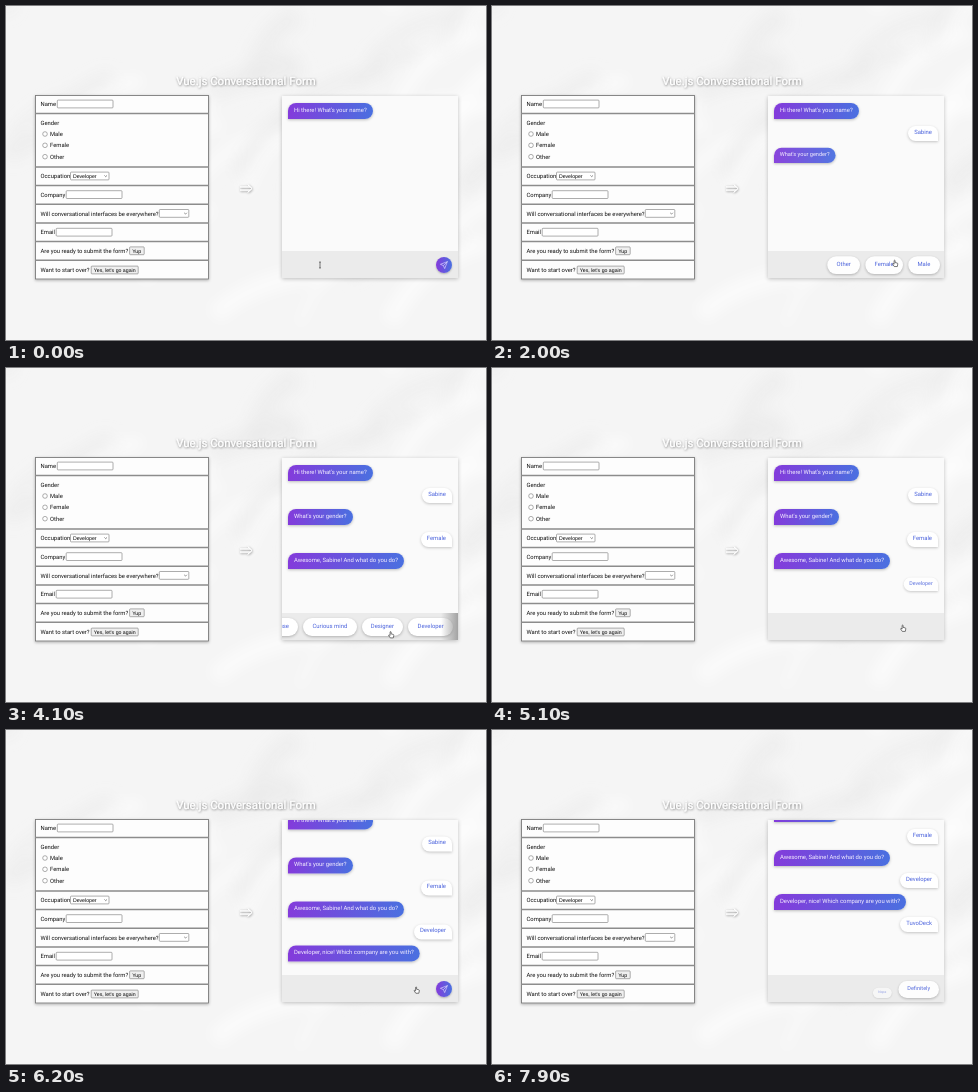
Recreate the animation shown at these times as an HTML page. Size 480 by 334 pixels, loop 8 s.

```html
<!DOCTYPE html>
<html lang="en">
<head>
<meta charset="utf-8">
<title>Conversational Form</title>
<style>
  html, body { margin: 0; width: 100%; height: 100%; overflow: hidden; background: #f5f5f5; }
  body { position: relative; font: 5.9px Roboto, "Open Sans", sans-serif; text-rendering: geometricPrecision; }
  svg { position: absolute; left: 0; top: 0; overflow: visible; }
  .ui { font: 5.2px "Liberation Sans", Arial, sans-serif; }
  .chat { position: absolute; left: 276px; top: 90px; width: 176px; height: 182px;
    background: #fafafa; box-shadow: 0 1px 4px rgba(0,0,0,.24); }
  .log { position: absolute; inset: 0 0 27px; overflow: hidden; }
  .foot { position: absolute; left: 0; right: 0; bottom: 0; height: 27px; background: #ebebeb; overflow: hidden; }
  .msg { position: absolute; padding: 0 6px; white-space: nowrap; }
  .bot { left: 6px; height: 16px; line-height: 16px; color: #f6f0ff; border-radius: 8px 8px 8px 0;
    background: linear-gradient(90deg, #843bdb, #4a70e0); box-shadow: 0 1px 3px rgba(0,0,0,.25); transform-origin: 0 100%; }
  .user { right: 6px; height: 15px; line-height: 15px; color: #4a62dc; border-radius: 8px 8px 0 8px;
    background: #fff; box-shadow: 0 1px 3px rgba(0,0,0,.22); transform-origin: 100% 100%; }
  .opts { position: absolute; right: 5px; top: 5px; display: flex; flex-direction: row-reverse; gap: 5px; }
  .opts div { flex: none; padding: 0 9.3px; height: 18px; line-height: 18px; border-radius: 9px; white-space: nowrap;
    background: #fff; color: #4a62dc; box-shadow: 0 1px 3px rgba(0,0,0,.25); transform-origin: 100% 100%; }
  .fade { position: absolute; right: 0; top: 0; width: 17px; height: 27px;
    background: linear-gradient(90deg, rgba(150,150,150,0), rgba(150,150,150,.85)); }
  .field { position: absolute; left: 6px; top: 8px; height: 12px; line-height: 12px; white-space: pre; color: #111; }
  .caret { position: absolute; left: 100%; top: 0; width: 1px; height: 12px; background: #222; }
  .send { position: absolute; left: 154px; top: 6px; width: 16px; height: 16px; border-radius: 50%;
    background: linear-gradient(90deg, #843bdb, #4a70e0); box-shadow: 0 1px 2px rgba(0,0,0,.25); }
</style>
</head>
<body>
<svg id="page" width="480" height="334" viewBox="0 0 480 334">
  <defs>
    <filter id="soft" x="-20%" y="-20%" width="140%" height="140%"><feGaussianBlur stdDeviation="7"/></filter>
    <filter id="lift" x="-20%" y="-40%" width="140%" height="200%">
      <feDropShadow dx="0.4" dy="0.7" stdDeviation="0.9" flood-color="#000" flood-opacity=".6"/></filter>
    <filter id="card" x="-10%" y="-10%" width="120%" height="120%">
      <feDropShadow dx="0" dy="1" stdDeviation="1.6" flood-color="#000" flood-opacity=".3"/></filter>
  </defs>
  <g id="marble" filter="url(#soft)" fill="none"></g>
  <text x="240" y="79.3" text-anchor="middle" font-size="11.45" fill="#fff" filter="url(#lift)">Vue.js Conversational Form</text>
  <path d="M234 180.9H244.3M234 184.1H244.3M241.8 178.8L246 182.5L241.8 186.2" fill="none" stroke="#fff" stroke-width="1" filter="url(#lift)"/>
  <g id="form"></g>
</svg>

<div class="chat">
  <div class="log"><div id="roll"></div></div>
  <div class="foot" id="foot">
    <div class="field"><span id="typed"></span><i class="caret" id="caret"></i></div>
    <div class="send" id="send">
      <svg width="16" height="16" viewBox="0 0 16 16" fill="none" stroke="#e9e2ff" stroke-width=".6" stroke-linejoin="round">
        <path d="M11.4 4.6L4.4 7.3L7.4 8.6L8.7 11.6ZM7.4 8.6L11.4 4.6"/></svg>
    </div>
  </div>
</div>

<svg width="480" height="334" viewBox="0 0 480 334" style="pointer-events:none">
  <g id="mouse">
    <path id="beam" d="M-1-3.2Q0-3.2 0-2.4Q0-3.2 1-3.2M0-2.4V2.4M-1 3.2Q0 3.2 0 2.4Q0 3.2 1 3.2" fill="none" stroke="#444" stroke-width=".7"/>
    <path id="arrow" d="M-.6-2.2V3.2L.6 2.1L1.5 4L2.4 3.6L1.6 1.8H3.3Z" fill="#111" stroke="#fff" stroke-width=".45"/>
    <path id="hand" d="M-.9-2.6Q-.4-3.3.1-2.6V-.6L2.2-.1Q2.9.1 2.8.9L2.3 3.4H-.7L-2.4 1Q-2.3.1-1.5.6L-.9 1Z" fill="#fff" stroke="#222" stroke-width=".6"/>
  </g>
</svg>

<script>
const LOOP = 8000;
const $ = id => document.getElementById(id);

// Backdrop: soft seeded streaks
let seed = 11;
const rnd = () => (seed = seed * 16807 % 2147483647) / 2147483647;
let streaks = '';
for (let i = 0; i < 34; i++) {
  const x = rnd() * 480, y = rnd() * 334, dx = 40 + rnd() * 80, dy = -20 - rnd() * 60;
  streaks += `<path d="M${x} ${y}q${dx * .3} ${dy * .8} ${dx} ${dy}" stroke="${i % 2 ? '#fff' : '#eaeaea'}" stroke-width="${6 + rnd() * 16}" opacity=".55"/>`;
}
$('marble').innerHTML = streaks;

// Plain form on the left
const label = (x, y, s) => `<text x="${x}" y="${y + 2.1}" font-size="5.85" fill="#111">${s}</text>`;
const box = (x, y, w, fill = '#fff') =>
  `<rect x="${x}" y="${y - 3.9}" width="${w}" height="7.8" rx=".8" fill="${fill}" stroke="#777" stroke-width=".6"/>`;
const ui = (x, y, s) => `<text class="ui" x="${x}" y="${y + 1.9}">${s}</text>`;
const select = (x, y, w, s) => box(x, y, w) + ui(x + 2.4, y, s) +
  `<path d="M${x + w - 4.6} ${y - .6}l1.3 1.3l1.3-1.3" fill="none" stroke="#444" stroke-width=".6"/>`;
const button = (x, y, w, s) => box(x, y, w, '#efefef') + ui(x + 2.6, y, s);
const radio = (y, s) => `<circle cx="39" cy="${y}" r="2.3" fill="#fff" stroke="#777" stroke-width=".6"/>` + label(44, y, s);

const rules = [107.5, 161, 179.5, 198.2, 217, 235.6, 254.3].map(y => `M29 ${y}H203`).join('');
$('form').innerHTML =
  `<rect x="29.5" y="89.5" width="173" height="183.5" fill="#fdfdfd" stroke="#7c7c7c" stroke-width=".9" filter="url(#card)"/>
   <path d="${rules}" stroke="#8c8c8c" stroke-width="1.5"/>` +
  label(34.5, 98, 'Name') + box(51.3, 98, 55.7) +
  label(34.5, 116.8, 'Gender') + radio(128, 'Male') + radio(139.3, 'Female') + radio(150.7, 'Other') +
  label(34.5, 170, 'Occupation') + select(64.5, 170, 38.5, 'Developer') +
  label(34.5, 188.6, 'Company') + box(60.2, 188.6, 55.8) +
  label(34.5, 207.4, 'Will conversational interfaces be everywhere?') + select(153.3, 207.4, 29.5, '') +
  label(34.5, 226.2, 'Email') + box(50.2, 226.2, 55.8) +
  label(34.5, 244.8, 'Are you ready to submit the form?') + button(123.6, 244.8, 14.6, 'Yup') +
  label(34.5, 264, 'Want to start over?') + button(85.2, 264, 47, "Yes, let's go again");

// Chat: [text, appears at]
const bots = [["Hi there! What's your name?", -900], ["What's your gender?", 1750],
  ['Awesome, Sabine! And what do you do?', 2520], ['Developer, nice! Which company are you with?', 5850]];
const users = [['Sabine', 1350], ['Female', 2020], ['Developer', 4940], ['TuvoDeck', 7580]];
// Option rows, first choice on the right
const menus = [
  { at: 1400, end: 2000, items: ['Male', 'Female', 'Other'] },
  { at: 2080, end: 4900, items: ['Developer', 'Designer', 'Curious mind', 'Spouse'], fade: true },
  { at: 7717, end: 9000, items: ['Definitely', 'Nope'] }];

const add = (parent, cls, text = '') => {
  const el = document.createElement('div');
  el.className = cls;
  el.textContent = text;
  return parent.appendChild(el);
};
const pops = [];   // {el, at, end, dur}
const addMsgs = (list, cls, top, dur) => list.forEach(([text, at], i) => {
  const el = add($('roll'), 'msg ' + cls, text);
  el.style.top = top + 44 * i + 'px';
  pops.push({ el, at, end: 9000, dur });
});
addMsgs(bots, 'bot', 7, 400);
addMsgs(users, 'user', 30, 300);
for (const m of menus) {
  const row = add($('foot'), 'opts');
  m.items.forEach((s, i) => pops.push({ el: add(row, '', s), at: m.at + 110 * i, end: m.end, dur: 300 }));
  if (m.fade) m.fadeEl = add($('foot'), 'fade');
}
pops.push({ el: $('send'), at: -900, end: 1320, dur: 300 });
const sendBack = $('foot').appendChild($('send').cloneNode(true));
pops.push({ el: sendBack, at: 5200, end: 7560, dur: 300 });

// Typing: [ms, text]
const typing = [[0, ''], [600, 'S'], [700, 'Sa'], [800, 'Sab'], [1000, 'Sabi'], [1100, 'Sabin'], [1300, 'Sabine'], [1320, ''],
  [6700, 'T'], [6800, 'Tu'], [7000, 'Tuv'], [7200, 'Tuvo'], [7400, 'TuvoDe'], [7500, 'TuvoDeck'], [7560, '']];
const carets = [[0, 0], [400, 1], [1320, 0], [5600, 1], [6100, 0], [6700, 1], [7560, 0]];
const scrolls = [[5100, 400, 13.6], [7600, 260, 51.4]];
// Pointer: [ms, x, y, shape]
const moves = [[0, 314, 259, 'beam'], [1050, 314, 259, ''], [1420, 314, 259, 'beam'], [1600, 350, 259, 'arrow'],
  [1850, 403, 258, 'hand'], [2050, 403, 257, 'arrow'], [2650, 403, 239, 'arrow'], [3000, 401, 244, 'arrow'],
  [3200, 385, 254, 'hand'], [3500, 345, 261, 'hand'], [3900, 385, 266.5, 'hand'], [4100, 385, 266.5, 'hand'],
  [4700, 411, 260, 'hand'], [6150, 411, 260, 'hand'], [6350, 408, 259, 'beam'], [6700, 408, 259, 'beam'],
  [7000, 392, 259, 'beam'], [7400, 392, 259, ''], [LOOP, 392, 259, '']];

const clamp = v => Math.min(1, Math.max(0, v));
const out = p => 1 - (1 - p) ** 3;
const inOut = p => p * p * (3 - 2 * p);
const lastAt = (list, t) => list.findLastIndex(s => s[0] <= t);

function draw(t) {
  for (const { el, at, end, dur } of pops) {
    const k = out(clamp((t - at) / dur)) * (1 - clamp((t - end) / 120));
    el.style.opacity = k;
    el.style.transform = k < 1 ? `scale(${k})` : 'none';
  }
  for (const m of menus) if (m.fadeEl)
    m.fadeEl.style.opacity = clamp((t - m.at - 300) / 200) * (1 - clamp((t - m.end) / 120));

  const up = scrolls.reduce((y, [at, dur, d]) => y + d * inOut(clamp((t - at) / dur)), 0);
  $('roll').style.transform = `translateY(${-up}px)`;

  $('typed').textContent = typing[lastAt(typing, t)][1];
  $('caret').style.opacity = carets[lastAt(carets, t)][1];

  const i = Math.min(lastAt(moves, t), moves.length - 2);
  const [t0, x0, y0, shape] = moves[i], [t1, x1, y1] = moves[i + 1];
  const k = inOut(clamp((t - t0) / (t1 - t0)));
  $('mouse').setAttribute('transform', `translate(${x0 + (x1 - x0) * k} ${y0 + (y1 - y0) * k})`);
  for (const id of ['beam', 'arrow', 'hand']) $(id).style.display = id === shape ? '' : 'none';
}

const start = performance.now();
function tick() {
  draw((performance.now() - start) % LOOP);
  requestAnimationFrame(tick);
}
tick();
</script>
</body>
</html>
```
